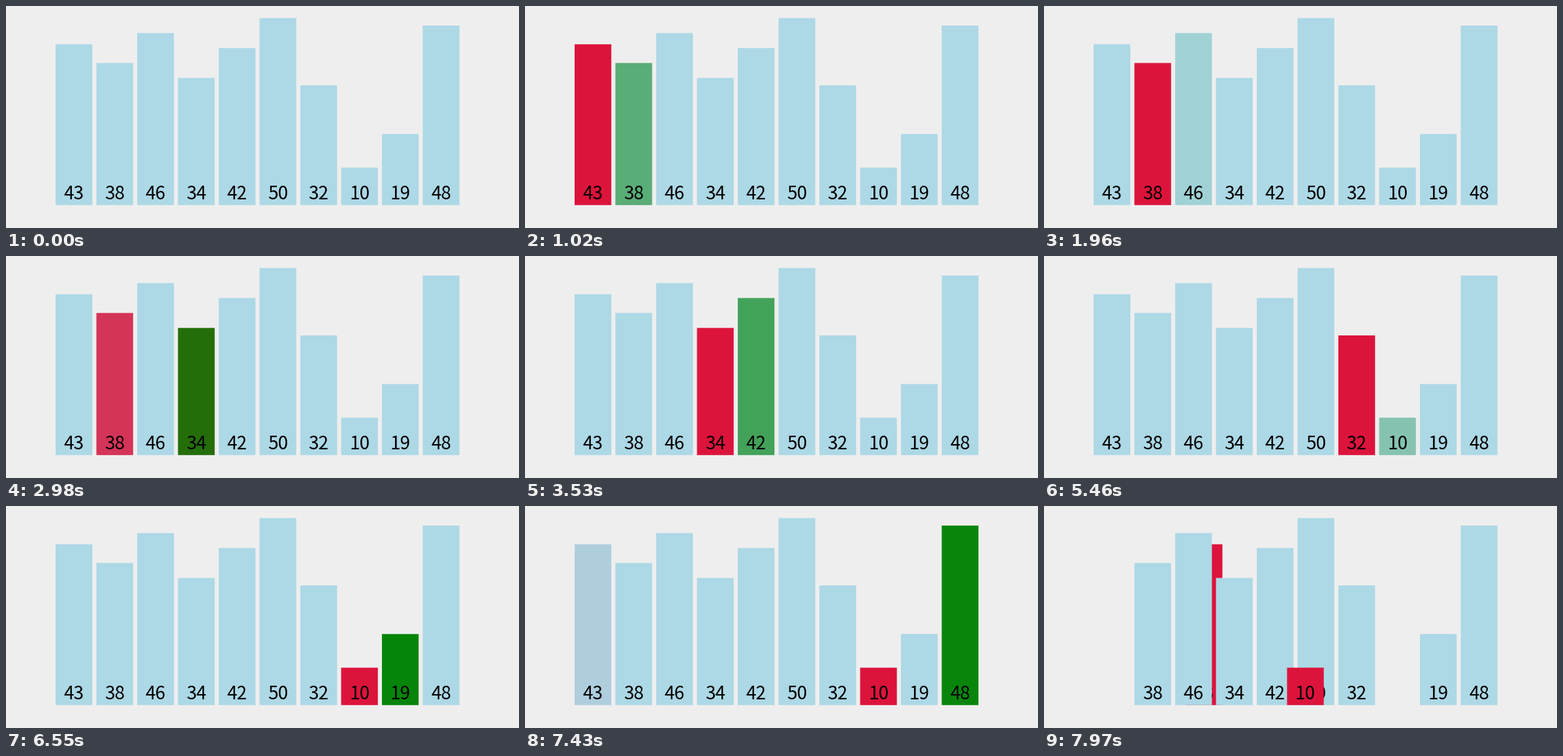
A matplotlib script for the animation above (8000 ms loop, 786 px wide and 341 px high).

```python
import numpy as np
import matplotlib.pyplot as plt
from matplotlib.animation import FuncAnimation
from matplotlib.colors import to_rgb
from matplotlib.patches import Rectangle

W, H, DPI = 786, 341, 100
LOOP, TICK = 8000, 10
VALUES = [43, 38, 46, 34, 42, 50, 32, 10, 19, 48]
LEFT, PITCH, BAR_W, BASE, UNIT = 76, 62.5, 56.25, 305.8, 5.744
IDLE, LOWEST, SCAN = (np.array(to_rgb(c)) for c in ("lightblue", "crimson", "green"))

# ms: each sorting step starts a fade; the picture is refreshed at a coarser beat
STEP_START, STEP_EVERY, FADE = 388, 497, 250
REFRESH_START, REFRESH_EVERY = 385, 78


def selection_pass(values):
    """Colour changes of one selection-sort pass, and the index of the minimum."""
    low, scan = 0, None
    steps = [{0: LOWEST}]
    for j in range(1, len(values)):
        step = {j: SCAN}
        if scan is not None:
            step[scan] = IDLE
        steps.append(step)
        scan = j
        if values[j] < values[low]:
            steps.append({low: IDLE, j: LOWEST})
            low, scan = j, None
    last = {0: LOWEST}
    if scan is not None:
        last[scan] = IDLE
    steps.append(last)
    return steps, low


STEPS, LOW = selection_pass(VALUES)


def progress(now, k):
    """Cubic in-out progress of step k."""
    u = (now - STEP_START - STEP_EVERY * k) / FADE
    u = min(max(u, 0), 1)
    return 4 * u**3 if u < 0.5 else 1 - 4 * (1 - u)**3


fig = plt.figure(figsize=(W / DPI, H / DPI), dpi=DPI, facecolor="#eeeeee")
ax = fig.add_axes([0, 0, 1, 1])
ax.set(xlim=(0, W), ylim=(H, 0))
ax.axis("off")

bars, labels = [], []
for i, v in enumerate(VALUES):
    x = LEFT + PITCH * i
    bars.append(ax.add_patch(Rectangle((x, BASE - UNIT * v), BAR_W, UNIT * v,
                                       lw=0, color=IDLE, snap=False, zorder=i + 1)))
    labels.append(ax.text(x + BAR_W / 2, 297, str(v), ha="center", va="baseline",
                          color="black", family="Noto Sans CJK JP", weight="light",
                          size=28 * 72 / DPI, zorder=i + 1.5))


def place(i, x):
    bars[i].set_x(x)
    labels[i].set_x(x + BAR_W / 2)


def draw(frame):
    beat = (frame * TICK - REFRESH_START) // REFRESH_EVERY
    now = REFRESH_START + REFRESH_EVERY * beat
    colors = [IDLE] * len(VALUES)
    for k, step in enumerate(STEPS):
        for i, target in step.items():
            colors[i] = colors[i] + (target - colors[i]) * progress(now, k)
    for bar, color in zip(bars, colors):
        bar.set_facecolor(color)
    # the swap follows the last colour step
    shift = PITCH * LOW * progress(now, len(STEPS))
    place(0, LEFT + shift)
    place(LOW, LEFT + PITCH * LOW - shift)
    return bars + labels


anim = FuncAnimation(fig, draw, frames=LOOP // TICK, interval=TICK,
                     init_func=lambda: draw(0), repeat=True, repeat_delay=0)
plt.show()
```
